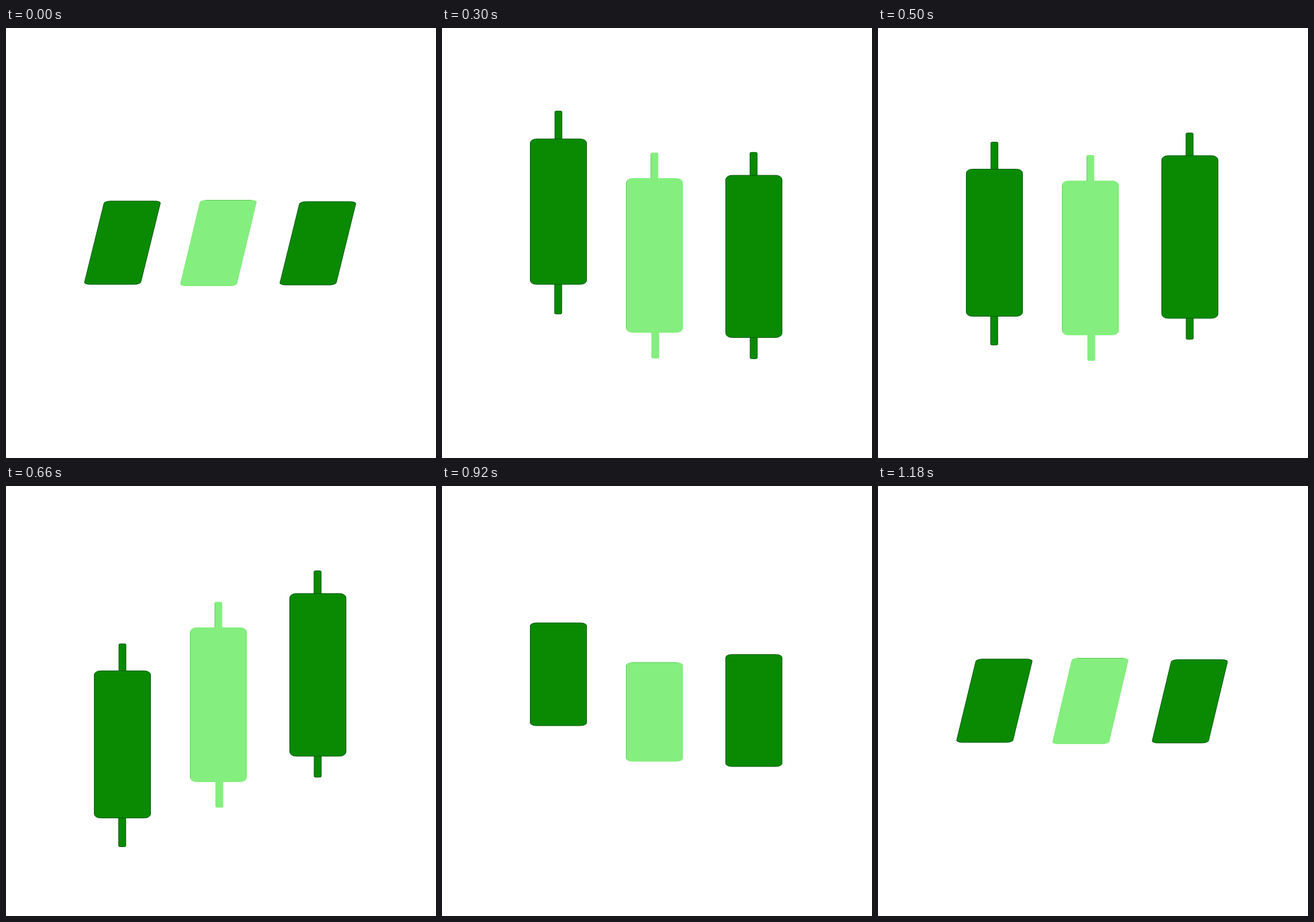
An HTML page for the animation above (1.2 s loop, 748 px wide and 748 px high).

```html
<!DOCTYPE html>
<html lang="en">
<head>
<meta charset="utf-8">
<title>Candles</title>
<style>
  html, body { margin: 0; width: 100%; height: 100%; overflow: hidden; background: #fff; }
  svg { display: block; width: 100vw; height: 100vh; }
</style>
</head>
<body>
<svg id="stage" viewBox="0 0 748 748"></svg>
<script>
const LOOP = 1200, STEP = 20, WIDTH = 99, LEAN = 18;
const DARK = { fill: '#0a8a02', edge: '#04540a' };
const LIGHT = { fill: '#84ee7e', edge: '#84ee7e' };

// h: short and tall body, wick: half length, grow/shrink: middle of the size change,
// lean: when the bar starts to tilt back, path: [ms, vertical offset]
const bars = [
  { x: 202.5, y: 373.5, h: [146, 257], wick: 177, wickY: 375, wickX: [0, -0.4], tone: DARK,
    grow: 213, shrink: 897, lean: 960,
    path: [[225, 0], [380, -139.5], [404, -152], [500, 0], [540, 74], [592, 128],
           [660, 76], [836, -152], [920, -46], [962, 0]] },
  { x: 369.5, y: 374, h: [150, 269], wick: 179, wickY: 374, wickX: [0, 1.5], tone: LIGHT, dots: true,
    grow: 185, shrink: 882, lean: 985,
    path: [[225, 0], [380, 52], [408, 55], [500, 26], [595, -2], [660, 6.5],
           [840, 40], [920, 19], [962, 0]] },
  { x: 542.5, y: 374.5, h: [146, 284], wick: 180, wickY: 373, wickX: [-0.5, -0.3], tone: DARK,
    grow: 200, shrink: 904, lean: 1014,
    path: [[225, 0], [380, 56], [408, 60], [500, -11], [595, -82], [660, -46],
           [840, 55], [920, 16], [962, 0]] }
];

const stage = document.getElementById('stage');

function add(parent, name, attrs) {
  const el = document.createElementNS('http://www.w3.org/2000/svg', name);
  set(el, attrs);
  parent.appendChild(el);
  return el;
}

function set(el, attrs) {
  for (const key in attrs) el.setAttribute(key, attrs[key]);
}

function ease(t, from, to) {
  const u = Math.min(1, Math.max(0, (t - from) / (to - from)));
  return (1 - Math.cos(Math.PI * u)) / 2;
}

const mix = (a, b, u) => a + (b - a) * u;

// Slope at a key: zero at turning points and at both ends
function slope(path, i) {
  if (i === 0 || i === path.length - 1) return 0;
  const [a, b, c] = [path[i - 1], path[i], path[i + 1]];
  const s = (b[1] - a[1]) / (b[0] - a[0]);
  const r = (c[1] - b[1]) / (c[0] - b[0]);
  return s * r <= 0 ? 0 : 2 * s * r / (s + r);
}

function follow(path, t) {
  const last = path.length - 1;
  if (t <= path[0][0]) return path[0][1];
  if (t >= path[last][0]) return path[last][1];
  let i = 0;
  while (path[i + 1][0] < t) i++;
  const [t0, p0] = path[i], [t1, p1] = path[i + 1];
  const d = t1 - t0, u = (t - t0) / d, v = 1 - u;
  return v * v * (1 + 2 * u) * p0 + u * u * (3 - 2 * u) * p1 +
         d * u * v * (v * slope(path, i) - u * slope(path, i + 1));
}

for (const bar of bars) {
  const paint = { fill: bar.tone.fill, stroke: bar.tone.edge, 'stroke-width': 1 };
  const dots = { fill: 'none', stroke: '#3f9a3c', 'stroke-width': 1, 'stroke-dasharray': '1 1' };
  bar.group = add(stage, 'g', {});
  bar.wicks = bar.wickX.map(() => add(bar.group, 'rect', { width: 12.4, rx: 3, ry: 1.5, ...paint }));
  bar.body = add(bar.group, 'rect', { x: 0.5 - WIDTH / 2, width: WIDTH - 1, rx: 11, ...paint });
  if (bar.dots) {
    bar.side = add(bar.group, 'path', dots);
    bar.top = add(bar.group, 'path', dots);
  }
}

function drawBar(bar, t) {
  const size = ease(t, bar.grow - 110, bar.grow + 110) * (1 - ease(t, bar.shrink - 90, bar.shrink + 90));
  const reach = ease(t, 90, 194) * (1 - ease(t, 836, 910));
  const lean = LEAN * (1 - ease(t, 0, 140) + ease(t, bar.lean, LOOP));
  const h = mix(bar.h[0], bar.h[1], size);
  const half = mix(50, bar.wick, reach);
  const mid = bar.wickY - bar.y;
  const ry = h * 0.027;

  set(bar.group, {
    transform: `matrix(1 0 ${-lean / (h / 2)} 1 ${bar.x} ${bar.y + follow(bar.path, t)})`
  });
  set(bar.body, { y: 0.5 - h / 2, height: h - 1, ry });
  bar.wicks.forEach((wick, i) => set(wick, {
    x: bar.wickX[i] - 6.2,
    y: i ? 0 : mid - half + 0.5,
    height: i ? mid + half - 0.5 : half - mid - 0.5,
    visibility: half > h / 2 - 2 ? 'visible' : 'hidden'
  }));

  if (!bar.dots) return;
  const left = 0.5 - WIDTH / 2, top = 0.5 - h / 2;
  const wickEdge = half > h / 2 ? `M-6.2 ${mid - half + 3}V${top}` : '';
  set(bar.side, {
    d: `M${left} ${top + ry}V${-top - ry}${wickEdge}`,
    visibility: lean < 2 ? 'visible' : 'hidden'
  });
  set(bar.top, {
    d: `M${left + 9} ${top}H${-left - 9}`,
    visibility: h < 180 ? 'visible' : 'hidden'
  });
}

function draw(now) {
  const t = Math.floor((now % LOOP) / STEP) * STEP;
  for (const bar of bars) drawBar(bar, t);
}

const start = performance.now();
function tick() {
  draw(performance.now() - start);
  requestAnimationFrame(tick);
}
tick();
</script>
</body>
</html>
```
